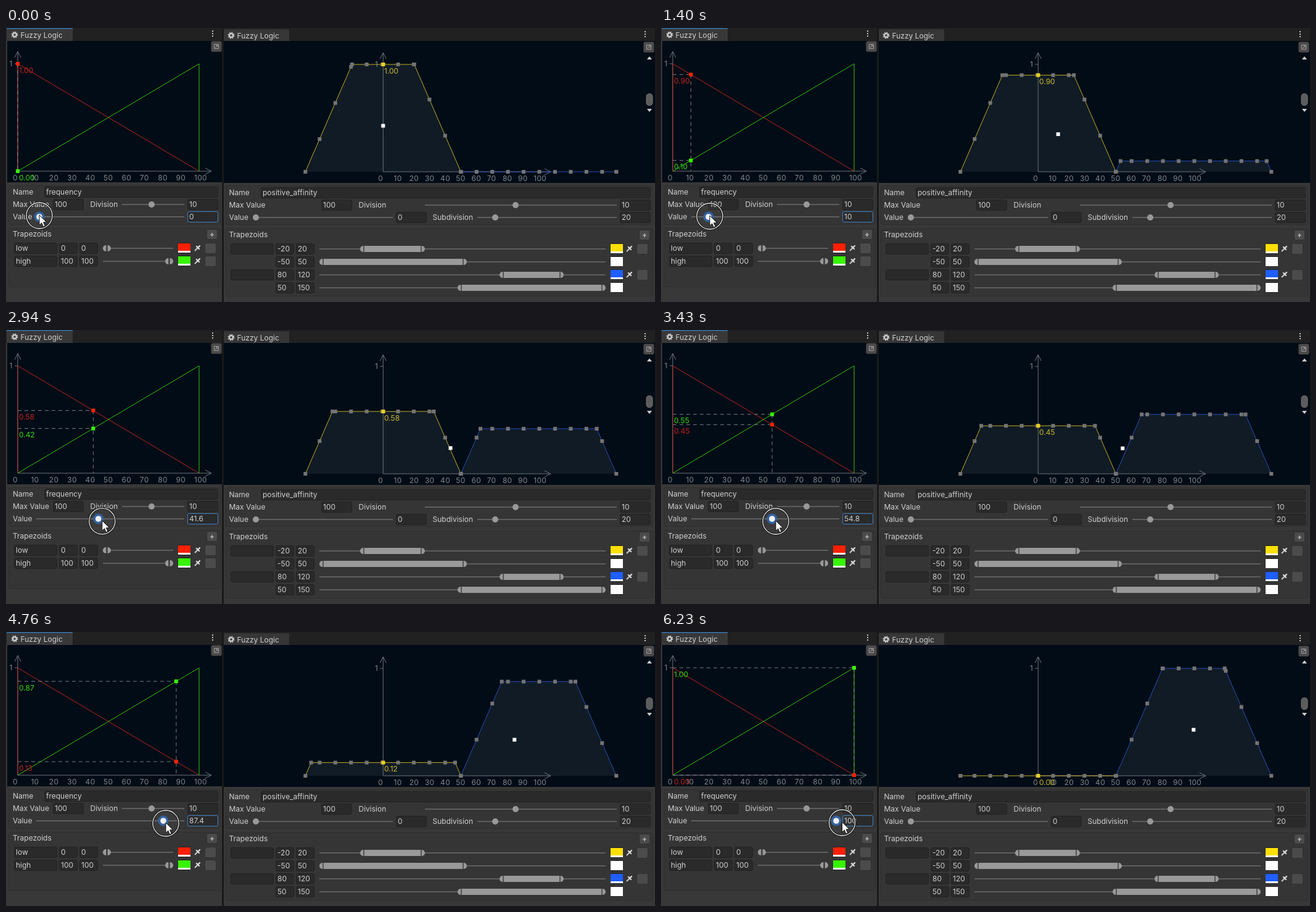
Recreate the animation shown at these times as an HTML page. Size 1052 by 444 pixels, loop 6300 ms.

```html
<!DOCTYPE html>
<html lang="en">
<head>
<meta charset="utf-8">
<title>Fuzzy Logic</title>
<style>
html, body { margin: 0; width: 100%; height: 100%; overflow: hidden; background: #191919; }
svg { display: block; }
text { font: 12px Inter, "Open Sans", sans-serif; fill: #d0d0d0; white-space: pre; }
.axis { fill: none; stroke: #6c737a; }
.scale text { fill: #80868c; letter-spacing: .3px; }
.line { fill: none; stroke-width: 1; }
.dash { fill: none; stroke: #747c84; stroke-dasharray: 6 5; }
.field { fill: #2a2a2a; stroke: #222; }
.box { fill: #353535; stroke: #2e2e2e; }
.button { fill: #4b4b4b; stroke: #303030; }
.track { stroke: #5e5e5e; stroke-width: 2; }
.knob { fill: #999; }
</style>
</head>
<body>
<svg id="stage" width="1052" height="444" viewBox="0 0 1052 444"></svg>
<script>
const stage = document.getElementById('stage');
const RED = '#ff2000', GREEN = '#36f500', YELLOW = '#ffdf00', BLUE = '#1f5eff';

const rect = (x, y, w, h, attrs = '') => `<rect x="${x}" y="${y}" width="${w}" height="${h}" ${attrs}/>`;
const path = (d, attrs = '') => `<path d="${d}" ${attrs}/>`;
const text = (x, mid, s, attrs = '') => `<text x="${x}" y="${mid + 4.3}" ${attrs}>${s}</text>`;
const dot = (x, y, color) => rect(x - 3, y - 3, 6, 6, `fill="${color}"`);
const field = (x, mid, w, s = '', attrs = '') =>
  rect(x + .5, mid - 8.5, w - 1, 17, `rx="2.5" class="field" ${attrs}`) + text(x + 3, mid, s);
const track = (x1, x2, y) => path(`M${x1} ${y}H${x2}`, 'class="track"');
const slider = (x1, x2, knob, y) => track(x1, x2, y) + `<circle class="knob" cx="${knob}" cy="${y}" r="5"/>`;
const range = (x1, x2, from, to, y) => track(x1, x2, y) +
  rect(from, y - 5, to - from, 10, 'rx="5" class="knob"') +
  path(`M${from + 6} ${y - 5}v10M${to - 6} ${y - 5}v10`, 'stroke="#333" stroke-width="1.3"');
const button = (x, y, w, h) => rect(x + .5, y + .5, w - 1, h - 1, 'rx="2.5" class="button"');
const plus = (x, y) => button(x - 9, y - 9, 18, 17) +
  path(`M${x - 3} ${y}h6M${x} ${y - 3}v6`, 'stroke="#d0d0d0" stroke-width="1.2"');
const swatch = (x, y, color) => rect(x, y - 9, 20, 17, 'fill="#222"') +
  rect(x, y - 8, 20, 15, 'fill="#fff"') + rect(x, y - 8, 20, 12, `fill="${color}"`);
const picker = (x, y) => path(`M${x - 4} ${y + 4}l5 -5`, 'stroke="#c8c8c8" stroke-width="2.2"') +
  path(`M${x - 1} ${y - 3}l4 4M${x + 1} ${y - 1}l3 -3`, 'stroke="#d8d8d8" stroke-width="2.4" stroke-linecap="round"');
const gear = (x, y) => `<g fill="none" stroke="#c8c8c8"><circle cx="${x}" cy="${y}" r="3" stroke-width="2.4"/>` +
  `<circle cx="${x}" cy="${y}" r="4.6" stroke-width="1.8" stroke-dasharray="1.8 1.81"/></g>`;
const menu = (x, y) => [-4, 0, 4].map(d => rect(x - 1, y + d - 1, 2, 2, 'fill="#c8c8c8"')).join('');
const expand = (x, y) => button(x - 9, y - 9, 18, 18) +
  path(`M${x - 3.5} ${y - 3.5}h7v7h-7zM${x - 2} ${y + 2}l4 -4M${x - .5} ${y - 2}h2.5v2.5`, 'fill="none" stroke="#aaa" stroke-width=".9"');

// Plot coordinates
const left = { x: v => 19 + 2.94 * v, y: m => 232 - 174 * m };
const right = { x: v => 611.3 + 2.52 * v, y: m => 233 - 174 * m };
const points = (plot, list) => 'M' + list.map(([v, m]) => plot.x(v) + ' ' + plot.y(m)).join('L');

function axes(plot, tipX, tipY, oneX) {
  const x = plot.x(0), y = plot.y(0), one = plot.y(1);
  let s = path(`M${x} ${y}V${tipY}M${x - 5} ${tipY + 10}L${x} ${tipY}l5 10M${x} ${y}H${tipX}` +
    `M${tipX - 10} ${y - 5}L${tipX} ${y}l-10 5M${x - 5} ${one}h5`, 'class="axis"');
  for (let v = 0; v <= 100; v += 10) s += text(plot.x(v) - 8, y + 10.3, v);
  return `<g class="scale">${s}${text(oneX, one, 1)}</g>`;
}

function leftWindow() {
  let s = rect(0, 0, 350, 444, 'fill="#383838"') + rect(0, 0, 350, 21, 'fill="#212121"') +
    rect(1, 0, 107, 21, 'fill="#383838"') + rect(1, 0, 107, 1.5, 'fill="#3672b0"') +
    gear(14, 11) + text(23.5, 11.5, 'Fuzzy Logic') + menu(335, 9) +
    rect(2, 21, 348, 229, 'fill="#020c16"') + expand(341, 30) +
    rect(4.5, 255.5, 343, 63, 'rx="3" class="box"') + rect(4.5, 324.5, 343, 95, 'rx="3" class="box"') +
    text(11, 266, 'Name') + field(62, 266, 282, 'frequency') +
    text(11, 286, 'Max Value') + field(76, 286, 50, '100') +
    text(136.5, 286, 'Division') + slider(188, 289, 236, 286) + field(294, 286, 50, '10') +
    text(11, 306, 'Value') + track(49, 289, 306) +
    text(11, 334, 'Trapezoids') + plus(334, 335);
  [['low', 0, 157, RED], ['high', 100, 258, GREEN]].forEach(([name, n, from, color], i) => {
    const y = 357 + 21 * i;
    s += field(13, y, 70, name) + field(86, y, 30, n) + field(119, y, 30, n) +
      range(157, 271, from, from + 13, y) + swatch(279, y, color) + picker(310, y) + button(322, y - 9, 19, 18);
  });
  return s + axes(left, 333, 38, 5.5);
}

function rightWindow() {
  let s = rect(353, 0, 699, 444, 'fill="#383838"') + rect(353, 0, 699, 21, 'fill="#212121"') +
    rect(353, 2, 106, 19, 'fill="#363636"') + gear(365, 12) + text(374.5, 12.5, 'Fuzzy Logic') + menu(1036, 10) +
    rect(353, 21, 699, 230, 'fill="#020c16"') + expand(1042, 31) +
    path('M1039 51h8l-4 -5zM1039 131h8l-4 5z', 'fill="#d0d0d0"') +
    rect(1038, 106.5, 10, 19, 'rx="4.5" fill="#5c5c5c" stroke="#747474"') +
    rect(356.5, 255.5, 692, 63, 'rx="3" class="box"') + rect(356.5, 325.5, 692, 109, 'rx="3" class="box"') +
    text(361.5, 267, 'Name') + field(413, 267, 632, 'positive_affinity') +
    text(361.5, 287, 'Max Value') + field(511, 287, 50, '100') +
    text(571.5, 287, 'Division') + slider(679, 990, 826, 287) + field(995, 287, 50, '10') +
    text(361.5, 307, 'Value') + slider(405, 627, 405, 307) + field(632, 307, 50, '0') +
    text(691.5, 307, 'Subdivision') + slider(764, 990, 793, 307) + field(995, 307, 50, '20') +
    text(361.5, 335, 'Trapezoids') + plus(1035, 336);
  const rows = [[-20, 20, 574, 679, YELLOW], [-50, 50, 508, 747, '#fff'],
    [80, 120, 800, 904, BLUE], [50, 150, 732, 972, '#fff']];
  rows.forEach(([a, b, from, to, color], i) => {
    const y = 358 + 21 * i;
    s += field(437, y, 30, a) + field(470, y, 30, b) + range(508, 972, from, to, y) + swatch(980, y, color);
    if (i % 2 === 0) s += field(364, y, 70) + picker(1010, y) + button(1022, y - 9, 19, 18);
  });
  return s;
}

stage.innerHTML = rect(0, 0, 1052, 444, 'fill="#191919"') + leftWindow() + rightWindow() + '<g id="live"></g>';
const live = document.getElementById('live');

// Dragging: time, slider value, output value, pointer x, pointer y
const keys = [
  [210, 0, 0, 54, 304], [1400, 10, 10, 79, 305], [2380, 28.3, 28.3, 124, 309],
  [3430, 54.8, 55.3, 186, 310], [3990, 72.2, 72.2, 222.5, 310],
  [4760, 87.4, 87.7, 259, 310], [6230, 101.5, 101.5, 293.5, 309]
];
const last = keys.length - 1;

function slope(i, c) {
  if (i === 0 || i === last) return 0;
  const rate = j => (keys[j + 1][c] - keys[j][c]) / (keys[j + 1][0] - keys[j][0]);
  return (rate(i - 1) + rate(i)) / 2;
}

function at(t, c) {
  if (t <= keys[0][0]) return keys[0][c];
  if (t >= keys[last][0]) return keys[last][c];
  const i = keys.findIndex(k => k[0] > t) - 1;
  const h = keys[i + 1][0] - keys[i][0], u = (t - keys[i][0]) / h, w = 1 - u;
  return keys[i][c] * w * w * (1 + 2 * u) + keys[i + 1][c] * u * u * (3 - 2 * u) +
    h * u * w * (w * slope(i, c) - u * slope(i + 1, c));
}

const clamp = v => Math.max(0, Math.min(100, v));

function inputPlot(v) {
  const x = left.x(v), low = 1 - v / 100, high = v / 100;
  const yl = left.y(low), yh = left.y(high);
  return path(points(left, [[0, 0], [0, 1], [100, 0]]), 'class="line" stroke="#b3261c"') +
    path(points(left, [[0, 0], [100, 1], [100, 0]]), 'class="line" stroke="#2fc40c"') +
    path(`M19 ${yl}H${x}M19 ${yh}H${x}M${x} ${Math.min(yl, yh)}V232`, 'class="dash"') +
    dot(x, yl, RED) + dot(x, yh, GREEN) +
    text(21, yl + 10.5, low.toFixed(2), 'style="fill:#c0221a"') +
    text(21, yh + 10.5, high.toFixed(2), 'style="fill:#35dc12"');
}

function outputPlot(v) {
  const sets = [{ mid: 0, level: 1 - v / 100, color: '#c0ac28' }, { mid: 100, level: v / 100, color: '#2a4db8' }];
  let area = 0, sumX = 0, sumY = 0, fills = '', lines = '', dots = '';
  for (const { mid, level, color } of sets) {
    const half = 50 - 30 * level;
    const d = points(right, [[mid - 50, 0], [mid - half, level], [mid + half, level], [mid + 50, 0]]);
    fills += path(d, 'fill="#101b25"');
    lines += path(d, `class="line" stroke="${color}"`);
    for (const x of [-50, -half, half, 50]) dots += dot(right.x(mid + x), right.y(Math.abs(x) === 50 ? 0 : level), '#747474');
    const a = level * (100 - 30 * level);
    area += a;
    sumX += a * mid;
    sumY += 50 * level ** 2 - 20 * level ** 3;
  }
  for (let i = 0; i <= 18; i++) {
    const x = -40.86 + 10.096 * i;
    const m = Math.max(...sets.map(s => Math.min(s.level, Math.max(0, (50 - Math.abs(x - s.mid)) / 30))));
    dots += dot(right.x(x), right.y(m), '#747474');
  }
  const y = right.y(sets[0].level);
  return fills + axes(right, 883, 40, 598) + lines + dots + dot(611.5, y, '#e8d020') +
    text(613, y + 10.5, sets[0].level.toFixed(2), 'style="fill:#cdb92c"') +
    dot(right.x(sumX / area), right.y(sumY / area), '#fff');
}

function pointer(v, x, y) {
  const knob = 54 + 2.3 * v;
  return field(294, 306, 50, +v.toFixed(1), 'style="stroke:#3d7fc4"') +
    `<circle cx="${knob}" cy="306" r="8.5" fill="#2c5d9c"/><circle cx="${knob}" cy="306" r="4.8" fill="#f0f0f0"/>` +
    `<circle cx="${x}" cy="${y}" r="21" fill="#fff" fill-opacity=".03" stroke="#151515" stroke-width="3.4"/>` +
    `<circle cx="${x}" cy="${y}" r="21" fill="none" stroke="#eee" stroke-width="1.3"/>` +
    path(`M${x} ${y - 1}v16.5l3.8 -3.6 2.6 6 2.8 -1.2 -2.6 -5.9h5.2z`, 'fill="#fff" stroke="#111"');
}

function draw(now) {
  const t = Math.floor(now % 6300 / 70) * 70;
  const v = clamp(at(t, 1));
  live.innerHTML = inputPlot(v) + outputPlot(clamp(at(t, 2))) + pointer(v, at(t, 3), at(t, 4));
}

const start = performance.now();
function tick() {
  draw(performance.now() - start);
  requestAnimationFrame(tick);
}
tick();
</script>
</body>
</html>
```
